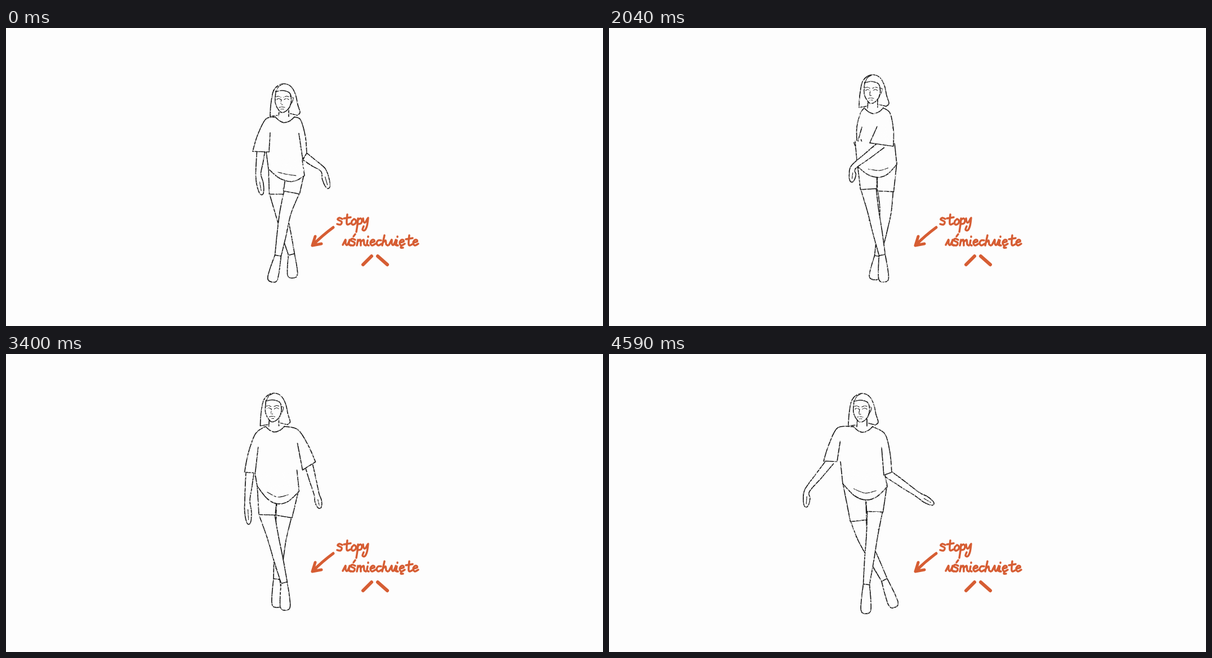
An HTML page that plays this animation: 1060x529 px, repeating every 4.76 s.

```html
<!DOCTYPE html>
<html lang="pl">
<head>
<meta charset="utf-8">
<title>Walk cycle</title>
<style>
html, body { margin: 0; width: 100%; height: 100%; overflow: hidden; background: #fdfdfd; }
svg { display: block; width: 1060px; height: 529px; }
path { stroke-linecap: round; stroke-linejoin: round; fill: none; }
#figure { stroke: #161616; stroke-width: 1.7; }
#figure .area { fill: #fdfdfd; stroke: none; }
#figure .thin { stroke-width: 1.2; }
#note { stroke: #d65d33; stroke-width: 3.5; }
</style>
</head>
<body>
<svg viewBox="0 0 1060 529">
  <filter id="pencil" filterUnits="userSpaceOnUse" x="320" y="50" width="300" height="425" color-interpolation-filters="sRGB">
    <feTurbulence id="grain" type="fractalNoise" baseFrequency=".3" numOctaves="2" result="noise"/>
    <feColorMatrix in="noise" values="0 0 0 0 0  0 0 0 0 0  0 0 0 0 0  3.5 0 0 0 -.75" result="mask"/>
    <feDisplacementMap in="SourceGraphic" in2="noise" scale="1.6" xChannelSelector="R" yChannelSelector="G"/>
    <feComposite in2="mask" operator="in"/>
  </filter>
  <g id="figure" filter="url(#pencil)"></g>
  <g id="note" role="img" aria-label="stopy uśmiechnięte">
    <g id="words"></g>
    <path stroke-width="5" d="M581 354Q562 368 545 385M549 370L544 386L560 383"/>
    <path stroke-width="6" d="M649 405L634 420M660 405L677 420"/>
  </g>
</svg>
<script>
const STEP = 170, COUNT = 28;
const keys = [0, 4, 8, 12, 18, 22, 27];

const points = s => s.trim().split(' ').map(p => p.split(',').map(Number));
const poses = text => text.trim().split('\n').map(points);
const lerp = (a, b, t) => a.map((v, i) => v + (b[i] - v) * t);
const move = (p, x, y) => [p[0] + x, p[1] + y];

// Key joints, one line per pose.
// Arms: shoulder, outer cuff, inner cuff, wrist, fingertip
const armsL = poses(`
461,162 438,219 467,220 448,259 454,294
444,152 421,209 440,213 411,255 407,283
444,143 433,202 438,204 430,250 426,284
446,152 440,200 442,201 450,225 452,236
446,148 433,216 444,215 440,258 441,305
440,135 414,204 441,207 417,262 421,295
406,131 381,190 405,191 352,242 350,270`);
const armsR = poses(`
523,163 534,222 527,234 563,252 572,283
514,159 527,218 512,224 574,231 595,246
506,154 521,210 484,208 505,242 504,264
499,151 505,210 463,204 434,247 431,272
522,136 558,189 536,207 571,241 582,262
515,133 541,194 517,205 532,257 532,283
490,142 502,210 488,215 549,250 575,266`);
// Legs: shorts cuff, knee, ankle, toe
const legsL = poses(`
482,295 489,331 507,402 509,443
470,295 476,336 496,397 508,439
451,270 447,312 455,356 454,404
461,286 469,325 485,403 488,450
465,286 475,328 492,407 493,455
462,285 473,323 496,405 499,453
443,296 452,328 489,401 507,449`);
const legsR = poses(`
507,292 496,328 483,404 472,450
498,284 493,325 480,403 470,446
490,282 490,322 481,399 469,443
491,290 491,327 477,405 470,446
497,290 497,328 505,390 515,436
490,287 478,328 456,409 447,462
472,280 467,323 457,409 456,460`);
// Shirt hem: left, lowest point, right
const hems = poses(`
466,250 500,272 530,262
450,245 484,264 517,243
440,242 482,258 497,253
441,246 480,265 511,242
447,233 483,268 521,246
445,236 481,264 520,241
415,230 455,259 494,236`);
const heads = poses(`
490,126
479,118
470,107
465,110
475,100
470,93
446,97`);

// Text to runs of points: "/" is a corner, "|" a gap.
function runs(text) {
  return text.split('|').flatMap(part => {
    let last;
    return part.split('/').map(piece => {
      const run = points(piece);
      if (last) run.unshift(last);
      last = run.at(-1);
      return run;
    });
  });
}

// Head parts around the point between the eyes
const hair = runs('-8,29 -21,31 / -20,12 -16,-12 -8,-23 4,-27 16,-22 24,-8 28,10 32,24 27,29 / 15,26');
const neck = runs('-5,20 -6,32 | -12,32 -4,39 4,42 14,39 22,32 | 12,31 12,18');
const face = runs('-11,-14 -12,6 -7,18 0,24 10,19 16,8 16,-5 12,-12 0,-15 -10,-13');
const details = runs('1,-26 -6,-22 -10,-14 | 16,-3 20,-2 18,6 15,9 | -10,-4 -6,-5 -2,-3 | 3,-3 8,-5 12,-4 | ' +
  '-9,1 -6,-1 -2,1 | 4,1 8,-1 12,1 | -1,1 -2,9 1,10 | -5,15 0,14 5,15 | -2,18 3,18');

// Smooth curve through all points of a run, without the opening move
function curve(p) {
  let d = '';
  for (let i = 1; i < p.length; i++) {
    const b = p[i - 1], c = p[i], a = p[i - 2] || b, e = p[i + 1] || c;
    const out = b.map((v, k) => v + (c[k] - a[k]) / 6);
    const into = c.map((v, k) => v - (e[k] - b[k]) / 6);
    d += `C${out} ${into} ${c}`;
  }
  return d;
}

const ink = (shape, kind = '') =>
  `<path class="${kind}" d="${shape.map(run => 'M' + run[0] + curve(run)).join('')}"/>`;
const solid = shape =>
  `<path class="area" d="M${shape.map(run => run[0] + curve(run)).join('L')}"/>` + ink(shape);

// Outline at half a width to either side of a chain of joints
function limb(joints, widths, squareEnd) {
  const left = [], right = [];
  joints.forEach((p, i) => {
    const a = joints[i - 1] || p, b = joints[i + 1] || p;
    const dx = b[0] - a[0], dy = b[1] - a[1];
    const k = widths[i] / 2 / Math.hypot(dx, dy);
    left.push(move(p, -dy * k, dx * k));
    right.unshift(move(p, dy * k, -dx * k));
  });
  return solid(squareEnd ? [left, [left.at(-1), right[0]], right] : [[...left, ...right]]);
}

function leg([cuff, knee, ankle, toe], waist, waistWidth) {
  return limb([ankle, lerp(ankle, toe, .45), lerp(ankle, toe, .85), toe], [11, 16, 18, 11]) +
    limb([cuff, knee, lerp(knee, ankle, .5), ankle], [27, 20, 16.5, 11], true) +
    limb([waist, cuff], [waistWidth, 29], true);
}

function arm([, outer, inner, wrist, tip]) {
  const elbow = lerp(outer, inner, .5);
  const finger = [lerp(wrist, tip, .4), lerp(wrist, tip, .85)];
  return limb([elbow, lerp(elbow, wrist, .5), wrist, lerp(wrist, tip, .5), tip], [14, 12, 9, 12, 6]) +
    ink([finger], 'thin');
}

function sleeve([shoulder, outer, inner], collar, side) {
  const bulge = move(lerp(shoulder, outer, .5), side * 3, 0);
  const armpit = [(shoulder[0] + inner[0]) / 2 - side * 5, shoulder[1] + 24];
  return solid([[collar, shoulder, bulge, outer], [outer, inner], [inner, armpit]]);
}

function shirt([left, low, right], topL, topR) {
  const sag = low[1] - (left[1] + right[1]) / 2;
  const a = lerp(left, low, .5), b = lerp(right, low, .5);
  const hem = [left, move(a, 0, sag / 4), low, move(b, 0, sag / 4), right];
  const fold = [move(a, 0, -5), move(low, 0, -12), move(b, 0, -5)];
  return solid([[[left[0] - 4, topL], left], hem, [right, [right[0] - 4, topR]]]) + ink([fold], 'thin');
}

const figure = document.getElementById('figure');
const grain = document.getElementById('grain');

function draw(step) {
  const k = keys.findLastIndex(key => key <= step);
  const next = Math.min(k + 1, keys.length - 1);
  const t = next > k ? (step - keys[k]) / (keys[next] - keys[k]) : 0;
  const at = rows => rows[k].map((p, i) => lerp(p, rows[next][i], t));

  const armL = at(armsL), armR = at(armsR), legL = at(legsL), legR = at(legsR);
  const hem = at(hems), [head] = at(heads);
  const [left, , right] = hem;
  const half = (right[0] - left[0]) / 2;
  const waist = f => move(lerp(left, right, f), 0, -5);

  // The leg whose toe is lower on the stage is nearer.
  const legs = [leg(legL, waist(.25), half), leg(legR, waist(.75), half)];
  if (legL[3][1] > legR[3][1]) legs.reverse();

  figure.innerHTML = arm(armL) + legs.join('') + shirt(hem, armL[2][1], armR[2][1]) + arm(armR) +
    sleeve(armL, move(head, -12, 32), -1) + sleeve(armR, move(head, 22, 32), 1) +
    `<g transform="translate(${head})">${solid(hair)}${solid(neck)}${solid(face)}${ink(details, 'thin')}</g>`;
  grain.setAttribute('seed', step + 1);
}

// Handwriting: advance width and strokes above a baseline at zero
const glyphs = {
  s: [12, '9,-10 4,-12 1,-9 8,-5 6,0 0,-1'],
  t: [13, '6,-18 5,-8 5,-2 7,0 11,-2 | 0,-11 12,-13'],
  o: [10, '5,-10 1,-6 1,-1 4,0 8,-3 8,-8 5,-10'],
  p: [10, '2,-11 1,0 -1,13 | 2,-8 6,-11 9,-8 7,-2 1,-1'],
  y: [10, '1,-11 2,-5 5,-4 9,-11 | 10,-12 8,2 4,10 0,9 2,3'],
  u: [13, '0,-1 3,-7 5,-10 5,-3 8,-1 12,-9 | 12,-10 11,-2 14,0'],
  m: [18, '2,-10 0,0 | 1,-6 6,-10 7,0 | 7,-6 12,-10 13,-2 16,0'],
  i: [6, '1,-9 0,-2 3,0 | 2,-15 2,-16'],
  e: [11, '1,-5 7,-7 6,-10 2,-9 0,-4 3,0 9,-3'],
  c: [10, '8,-9 3,-9 0,-4 3,0 9,-3'],
  h: [12, '4,-18 0,0 | 2,-6 6,-9 7,-2 10,0']
};
glyphs.n = glyphs.u;
glyphs['ś'] = [12, glyphs.s[1] + ' | 6,-16 9,-20'];
glyphs['ę'] = [11, glyphs.e[1] + ' | 3,0 2,4 6,4'];

function write(word, x, y) {
  return [...word].map(letter => {
    const [width, strokes] = glyphs[letter];
    const shape = runs(strokes).map(run => run.map(p => move(p, x, y)));
    x += width;
    return ink(shape);
  }).join('');
}
document.getElementById('words').innerHTML = write('stopy', 588, 349) + write('uśmiechnięte', 598, 386);

let shown = -1;
function tick(now) {
  const step = Math.floor(now / STEP) % COUNT;
  if (step !== shown) draw(shown = step);
  requestAnimationFrame(tick);
}
requestAnimationFrame(tick);
</script>
</body>
</html>
```
